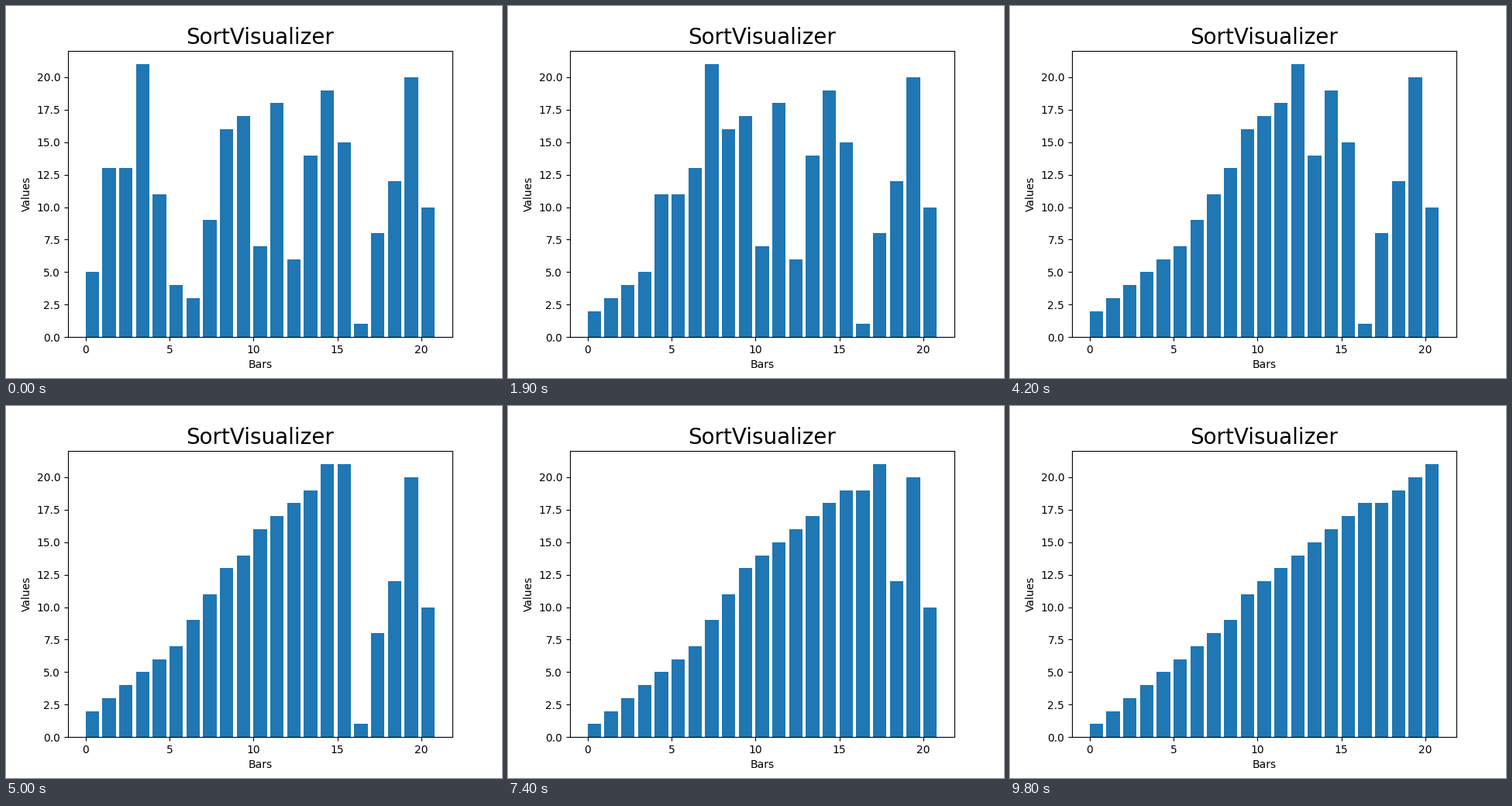
A matplotlib script for the animation above (9.9 s loop, 640 by 480 pixels).

```python
import matplotlib.pyplot as plt
from matplotlib.animation import FuncAnimation

VALUES = [5, 13, 2, 21, 11, 4, 3, 9, 16, 17, 7,
          18, 6, 14, 19, 15, 1, 8, 12, 20, 10]
FRAMES = 99
INTERVAL = 100


def insertion_steps(values):
    """Yield the list after every shift and after every moved key lands."""
    a = list(values)
    for i in range(1, len(a)):
        key, j = a[i], i
        while j > 0 and a[j - 1] > key:
            a[j] = a[j - 1]
            j -= 1
            yield list(a)
        if j < i:
            a[j] = key
            yield list(a)


steps = list(insertion_steps(VALUES))[:FRAMES]

fig, ax = plt.subplots(figsize=(6.4, 4.8), dpi=100)
bars = ax.bar(range(len(VALUES)), VALUES, align="edge")
ax.set_title("SortVisualizer", fontsize=20)
ax.set_xlabel("Bars")
ax.set_ylabel("Values")


def draw(frame):
    for bar, height in zip(bars, steps[frame]):
        bar.set_height(height)
    return bars.patches


anim = FuncAnimation(fig, draw, frames=FRAMES, interval=INTERVAL,
                     repeat=True, repeat_delay=0)
plt.show()
```
